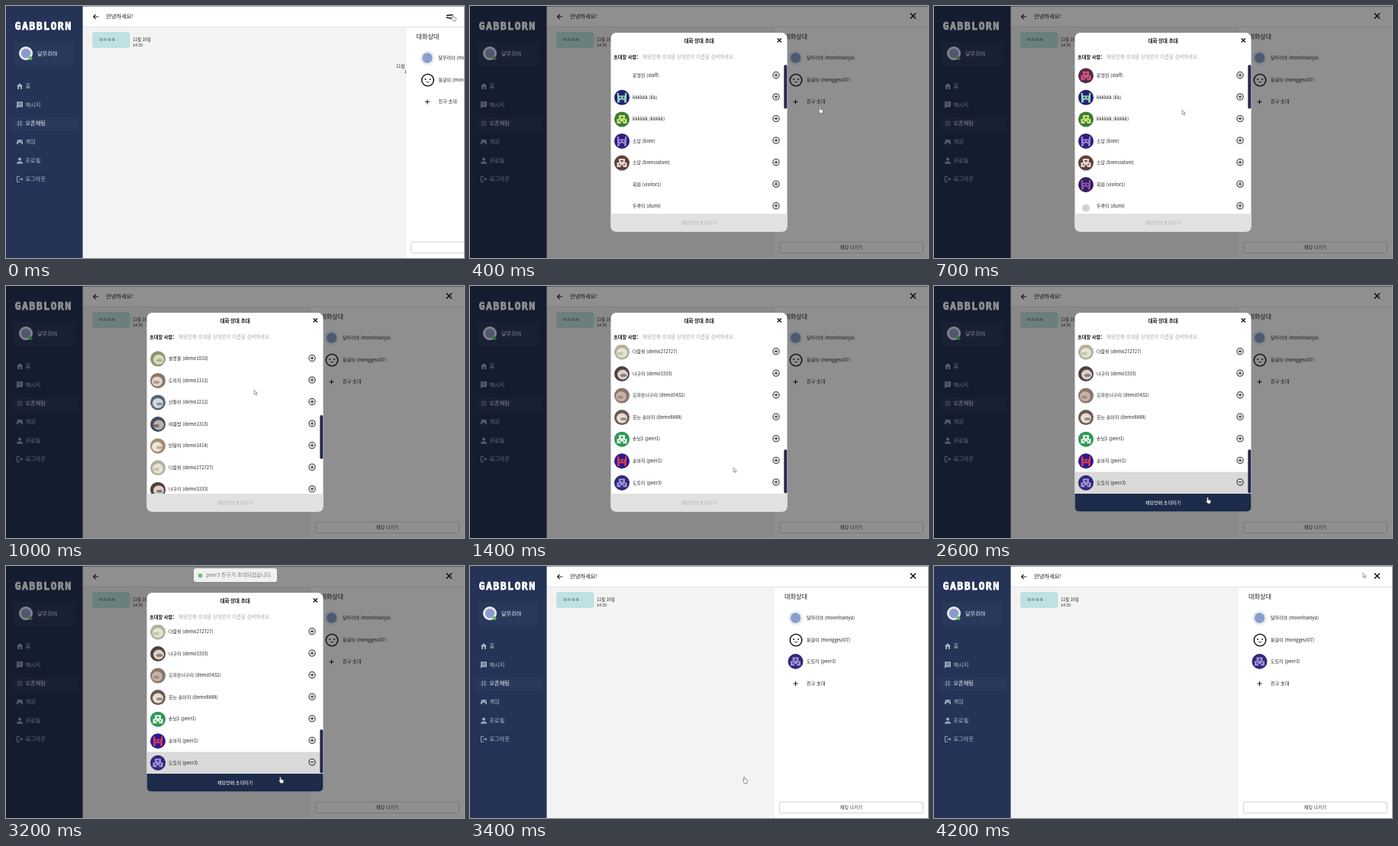
An HTML page for the animation above (4800 ms loop, 600 by 330 pixels).

```html
<!DOCTYPE html>
<html lang="ko">
<head>
<meta charset="utf-8">
<title>채팅방 초대</title>
<style>
  html, body { margin: 0; width: 100%; height: 100%; overflow: hidden; background: #fff; }
  svg { display: block; width: 100vw; height: 100vh; }
  text { font-family: "Noto Sans CJK KR", "Noto Sans CJK", "Noto Sans", sans-serif; }
  .logo { font-family: "DejaVu Sans Mono", monospace; }
</style>
</head>
<body>
<svg id="stage" viewBox="0 0 600 330"></svg>
<script>
const LOOP = 4800, STEP = 100;
const ROW = 28.55, LIST_TOP = 77, LIST_H = 195;
const INK = '#222', NAVY = '#243356';

// Keyframe tables: [ms, value, value...]
const cursorPath = [
  [0, 584, 11], [100, 560, 40], [200, 490, 110], [300, 457, 132], [400, 457, 132],
  [500, 420, 135], [600, 350, 136], [700, 325, 136], [1200, 325, 136], [1300, 334, 190],
  [1400, 345, 237.5], [1500, 365, 244], [1700, 400, 255], [1900, 400, 255],
  [2100, 366, 273], [2200, 356, 277], [3000, 358, 276], [3500, 358, 276],
  [3700, 430, 170], [3900, 550, 24], [4000, 562, 9]
];
const scrollPath = [[700, 0], [800, 60], [900, 180], [1000, 310], [1100, 420], [1200, 461.6]];
const panelPath = [[0, 125.5], [100, 20], [200, 0]];
const toastPath = [[2800, -24], [2900, -8], [3000, 0]];

// [display name, id, background, foreground, kind]
const people = [
  ['운영진', 'staff', '#55294d', '#d65a7d', 'block'],
  ['kkkkkk', 'kk', '#261f78', '#91dfb0', 'block'],
  ['kkkkkk', 'kkkkk', '#3c7c37', '#c8e377', 'block'],
  ['소담', 'bom', '#2c1e7d', '#a184d6', 'block'],
  ['소담', 'bomsodam', '#5b403b', '#e5d6c9', 'block'],
  ['회원', 'visitor1', '#30205b', '#9150ae', 'block'],
  ['두루미', 'dumi', '#fff', '#d2d2d2', 'plain'],
  ['바람', 'baram', '#364d85', '#b7d5e9', 'block'],
  ['구름빵', 'gureum', '#803a49', '#edc2ba', 'block'],
  ['새벽별', 'dawn01', '#2b6a64', '#a3e0cc', 'block'],
  ['물방울', 'drop22', '#2c2470', '#9a90d8', 'block'],
  ['솔방울', 'demo1010', '#8b9870', '#ded9c7', 'photo'],
  ['도라지', 'demo1111', '#8a7566', '#e2d6ca', 'photo'],
  ['산들이', 'demo1212', '#566778', '#d4dbe0', 'photo'],
  ['여름밤', 'demo1313', '#444c62', '#bcb1a6', 'photo'],
  ['반달이', 'demo1414', '#a08c74', '#eee3d4', 'photo'],
  ['다람쥐', 'demo272727', '#aeb29a', '#e9e2d3', 'photo'],
  ['너구리', 'demo3333', '#4d4340', '#ddd0c8', 'photo'],
  ['모자쓴너구리', 'demo5432', '#8a756b', '#c6b3a7', 'photo'],
  ['웃는 송아지', 'demo8888', '#675b50', '#e7ddd0', 'photo'],
  ['손님1', 'peer1', '#2f9655', '#e5f5e8', 'block'],
  ['송아지', 'peer2', '#2c1b8c', '#d5395a', 'block'],
  ['도토리', 'peer3', '#302877', '#9c94d9', 'block']
];

const stage = document.getElementById('stage');
const $ = id => document.getElementById(id);

const rect = (x, y, w, h, fill, r = 0, extra = '') =>
  `<rect x="${x}" y="${y}" width="${w}" height="${h}" rx="${r}" fill="${fill}" ${extra}/>`;
const circle = (x, y, r, fill, extra = '') =>
  `<circle cx="${x}" cy="${y}" r="${r}" fill="${fill}" ${extra}/>`;
const line = (d, color = INK, w = 1) =>
  `<path d="${d}" fill="none" stroke="${color}" stroke-width="${w}"/>`;
const label = (x, y, s, size, fill = INK, extra = '') =>
  `<text x="${x}" y="${y + size * .3}" font-size="${size}" fill="${fill}" ${extra}>${s}</text>`;
const group = (id, body, extra = '') => `<g id="${id}" ${extra}>${body}</g>`;
const at = (x, y, body) => `<g transform="translate(${x} ${y})">${body}</g>`;

// Mirrored blocky figure: even seeds give a bust, odd seeds an eared head.
function blocks(fg, bg, seed) {
  const v = n => (seed * 7 + n * 5) % 3;
  const pair = (x, y, w, h, c) => rect(x, y, w, h, c) + rect(-x - w, y, w, h, c);
  if (seed % 2 === 0) return rect(-4, -5.5, 8, 5, fg) + rect(-6.5, -.5, 13, 6, fg) +
    rect(-1.5, -3.5, 3, 2, bg) + pair(2.5, 1, 1.5, 2, bg) + rect(-1.5, 3, 3, 2.5, bg);
  return rect(-6, -2.5, 12, 6, fg) + pair(4, -6, 2.2, 4, fg) +
    pair(1.2, -1, 2, 2, bg) + pair(3, 3.5, 3, 3, fg) + rect(-1.5, 2.5, 3, 1 + v(4) / 2, bg);
}

function avatar(x, y, i) {
  const [, , bg, fg, kind] = people[i];
  let art;
  if (kind === 'block') art = blocks(fg, bg, i);
  else if (kind === 'plain') return at(x, y, circle(0, 2, 5, fg));
  else art = `<ellipse cx="${i % 3 - 1}" cy="1" rx="7" ry="6.5" fill="${fg}"/>` +
    `<ellipse cx="${i % 2 * 4 - 2}" cy="2" rx="4" ry="2" fill="${bg}" opacity=".6"/>`;
  return at(x, y, circle(0, 0, 10, bg) + art);
}

const profile = (x, y, r) => at(x, y, circle(0, 0, r, '#e8edf5') + circle(0, 0, r * .7, '#8a9fc8'));
const mascot = (x, y) => at(x, y,
  circle(0, 0, 7.8, '#fff', `stroke="${INK}" stroke-width="1.6"`) +
  circle(-3, -1, 1, INK) + circle(3, -1, 1, INK) + line('M-2 2Q0 4 2 2', INK, .9));
const plus = (x, y) => line(`M${x - 3} ${y}h6M${x} ${y - 3}v6`, INK, 1.1);
const cross = (x, y, r) => line(`M${x - r} ${y - r}l${2 * r} ${2 * r}m0 ${-2 * r}l${-2 * r} ${2 * r}`, '#111', 1.4);

function sidebar() {
  const dim = '#a3acbf';
  const icons = [
    `<path d="M-4 0L0-4 4 0H3V4H1V1H-1V4H-3V0Z" fill="${dim}"/>`,
    `<path d="M-4-4H4V3H-2L-4 5Z" fill="${dim}"/>` + line('M-2.5-2H2.5M-2.5 0H2.5', NAVY, .7),
    line('M-1.5-4V4M1.5-4V4M-4-1.5H4M-4 1.5H4', '#8591aa', .8),
    `<path d="M-3-3H3Q4 0 4.2 3Q3 4 1.5 1H-1.5Q-3 4-4.2 3Q-4 0-3-3Z" fill="${dim}"/>` + circle(-2, -1, .7, NAVY) + circle(2, -1, .7, NAVY),
    circle(0, -2, 2, dim) + `<path d="M-4 4Q-4 1 0 1T4 4Z" fill="${dim}"/>`,
    line('M0-3.5H-3.5V3.5H0M-1 0H4M2-2L4 0 2 2', dim, 1)
  ];
  const items = ['홈', '메시지', '오픈채팅', '게임', '프로필', '로그아웃'].map((name, i) => {
    const y = 105 + i * 24.35;
    return at(18, y, icons[i]) + label(25.5, y, name, 7.2, i === 2 ? '#fff' : '#b5bdcc');
  }).join('');
  return rect(0, 0, 100.5, 330, NAVY) +
    label(11.5, 26.8, 'GABBLORN', 13.2, '#fff', 'class="logo" font-weight="700" letter-spacing="1.45" stroke="#fff" stroke-width=".8"') +
    rect(10, 47, 80, 31, '#2a385c', 4) + profile(26, 62, 9) + circle(32, 68.5, 2.4, '#55bd5a') +
    label(41, 62.5, '달무리야', 7.2, '#f3f5f9') +
    rect(8, 145, 87, 19, '#2a385c', 3) + items;
}

function chat() {
  const stamp = (x, anchor, y) =>
    label(x, y, '11월 16일', 5.5, INK, `text-anchor="${anchor}"`) +
    label(x, y + 7.5, '14:35', 5.3, INK, `text-anchor="${anchor}"`);
  return rect(100, 27, 500, 303, '#f3f3f3') +
    rect(113, 34, 49.5, 21, '#bfe1e1', 4) + label(121, 44, 'ㅋㅋㅋㅋ', 6) +
    stamp(166, 'start', 44) + stamp(535, 'end', 79) +
    rect(100, 27, 500, 1, '#e2e2e2') + rect(100, 0, 500, 27, '#fff') + rect(100, 0, 500, .8, '#888') +
    line('M121 14H114.5M117.5 11L114.5 14 117.5 17', INK, 1.1) +
    group('heading', label(131, 14, '안녕하세요!', 7.3));
}

function panel() {
  const invite = label(441, 125.5, '친구 초대', 6.2) + plus(426.5, 125.5);
  return rect(399, 28, 201, 302, '#fff') + label(412, 41, '대화상대', 8.2) +
    profile(426.5, 68, 9.5) + label(441, 68.5, '달무리야 (moonhaloya)', 6) +
    mascot(427, 97) + label(441, 97, '몽글이 (monggeul07)', 6) +
    group('newcomer', avatar(426.5, 125, 22) + label(441, 125.5, '도토리 (peer3)', 6)) +
    group('invite', invite) +
    rect(405.5, 309, 188, 14.5, '#fff', 2, 'stroke="#c6c6c6" stroke-width=".8"') +
    label(499.5, 316, '채팅 나가기', 6, '#333', 'text-anchor="middle"');
}

function modal() {
  const last = people.length - 1;
  const rows = people.map(([name, id], i) => {
    const y = (i + .5) * ROW;
    return (i === last ? group('picked', rect(184.5, y - ROW / 2, 227, ROW, '#d9d9d9')) : '') +
      group('avatar' + i, avatar(199, y, i)) + label(213, y, `${name} (${id})`, 6) +
      circle(401, y - .9, 4.1, 'none', `stroke="${INK}" stroke-width="1"`) +
      line(`M398.7 ${y - .9}h4.6`, INK, 1) +
      group('bar' + i, line(`M401 ${y - 3.2}v4.6`, INK, 1));
  }).join('');
  return rect(184.5, 35, 231, 260.5, '#fff', 7) +
    label(300, 46, '대화 상대 초대', 6.4, '#111', 'text-anchor="middle" font-weight="700"') + cross(405.3, 45, 2.6) +
    label(188, 67, '초대할 사람:', 6.2, '#111', 'font-weight="700"') +
    label(226, 67, '채팅방에 초대할 상대방의 이름을 검색하세요.', 6.4, '#aaa') +
    `<g clip-path="url(#listClip)">${group('rows', rows)}</g>` +
    rect(411.3, LIST_TOP, 4, 57.5, '#24294e', 2, 'id="thumb"') +
    '<path id="footer" d="M184.5 272H415.5V288.5Q415.5 295.5 408.5 295.5H191.5Q184.5 295.5 184.5 288.5Z"/>' +
    label(300, 284, '채팅방에 초대하기', 6.1, '#b4b4b4', 'id="send" text-anchor="middle"');
}

stage.innerHTML =
  `<defs><clipPath id="listClip">${rect(184.5, LIST_TOP, 231, LIST_H, '#000')}</clipPath></defs>` +
  chat() + group('panel', panel()) + line('', '#111', 1.5).replace('<path', '<path id="menu"') + sidebar() +
  group('dialog', rect(0, 0, 600, 330, 'rgba(0,0,0,.44)') + modal()) +
  group('toast', rect(246, 3.5, 109, 18.5, '#000', 3, 'opacity=".1"') + rect(246, 3, 109, 18, '#f0f0f0', 3) +
    circle(254.5, 12.5, 2.8, '#6dbb78') + label(262, 12.3, 'peer3 친구가 초대되었습니다.', 6.8, '#777')) +
  group('cursor',
    '<path id="arrow" d="M0 0V6L1.5 4.7 2.6 7 3.6 6.5 2.5 4.3H4.4Z" fill="#fff" stroke="#666" stroke-width=".6"/>' +
    '<path id="hand" d="M.5.8Q1.5-.5 2.2.8V3.4L5 4Q6 4.4 5.6 6L5 8.5H1.8L-.5 5.6Q-.7 4.5.5 5Z" fill="#fff" stroke="#444" stroke-width=".6"/>');

function sample(table, t) {
  if (t <= table[0][0]) return table[0].slice(1);
  for (let i = 1; i < table.length; i++) {
    const [a, b] = [table[i - 1], table[i]];
    if (t <= b[0]) return b.slice(1).map((v, k) => a[k + 1] + (v - a[k + 1]) * (t - a[0]) / (b[0] - a[0]));
  }
  return table[table.length - 1].slice(1);
}

const show = (id, on) => $(id).setAttribute('visibility', on ? 'inherit' : 'hidden');
const move = (id, x, y) => $(id).setAttribute('transform', `translate(${x} ${y})`);
const within = (t, from, to) => t >= from && t < to;

function render(t) {
  const [scroll] = sample(scrollPath, t);
  const picked = t >= 1900, joined = t >= 3300;

  move('cursor', ...sample(cursorPath, t));
  const pointing = t < 100 || within(t, 300, 500) || within(t, 1700, 3600);
  show('hand', pointing);
  show('arrow', !pointing);

  move('panel', sample(panelPath, t)[0], 0);
  $('menu').setAttribute('d', t < 100
    ? 'M577 12.5L585 11.5M577 15L585 16.5'
    : 'M577 9.5l7 7m0-7l-7 7');
  show('heading', !within(t, 3100, 3300));
  show('newcomer', joined);
  move('invite', 0, joined ? 28.5 : 0);

  show('dialog', within(t, 300, 3300));
  $('dialog').setAttribute('opacity', t < 400 ? .6 : 1);
  move('rows', 0, LIST_TOP - scroll);
  move('thumb', 0, scroll * LIST_H / (people.length * ROW));
  people.forEach((_, i) => show('avatar' + i, t >= (i > 0 && i < 5 ? 400 : 500)));
  show('picked', picked);
  show('bar' + (people.length - 1), !picked);
  $('footer').setAttribute('fill', picked ? '#1c2b49' : '#e1e1e1');
  $('send').setAttribute('fill', picked ? '#fff' : '#b4b4b4');

  show('toast', within(t, 2900, 3400));
  move('toast', 0, sample(toastPath, t)[0]);
}

let start;
function tick(now) {
  start ??= now;
  render(Math.floor((now - start) % LOOP / STEP) * STEP);
  requestAnimationFrame(tick);
}
render(0);
requestAnimationFrame(tick);
</script>
</body>
</html>
```
